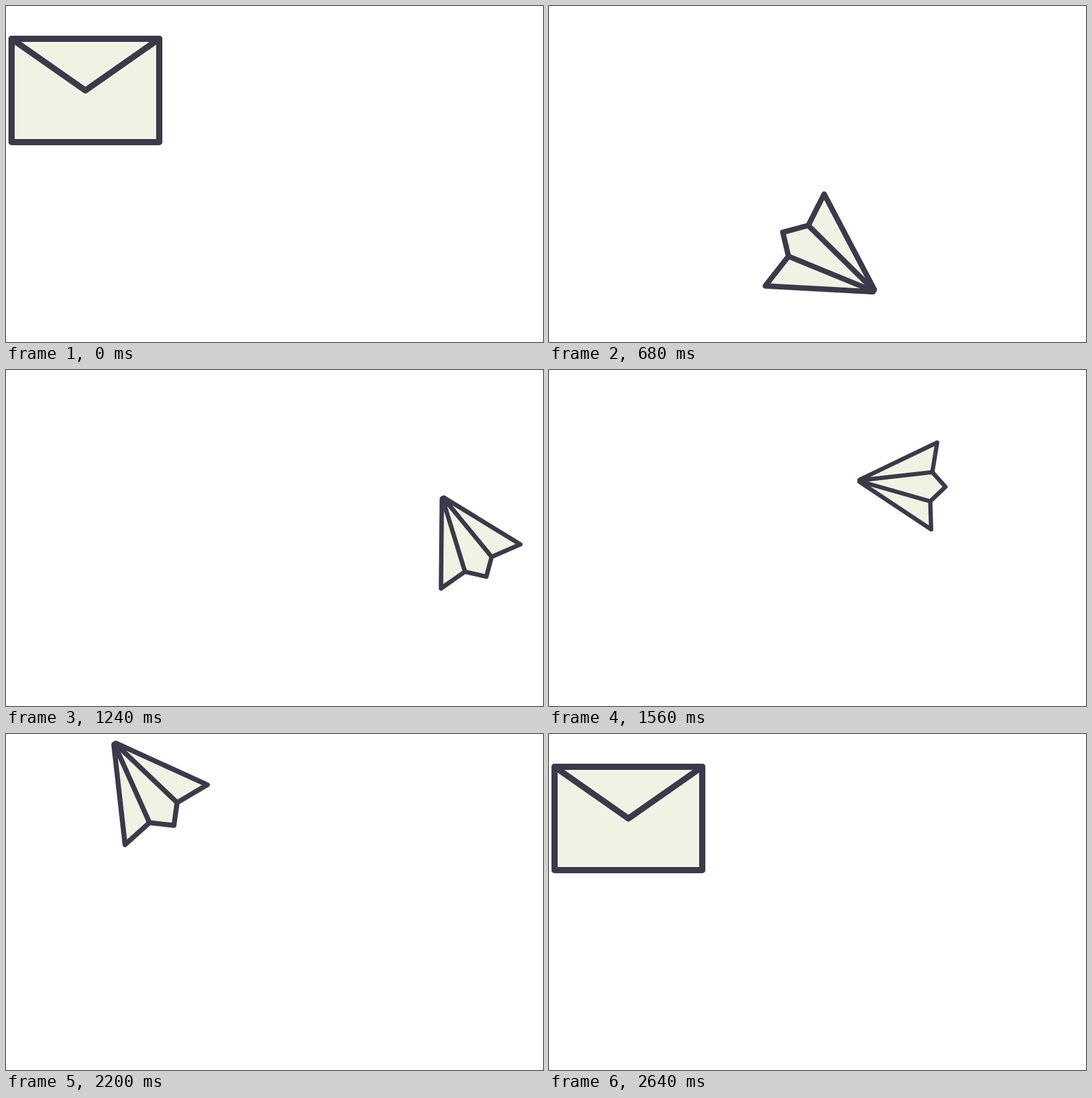
These frames come from a looping animation (869x543 px, 2.68 s). An HTML page:

```html
<!DOCTYPE html>
<html lang="en">
<head>
<meta charset="utf-8">
<title>Envelope to paper plane</title>
<style>
  html, body { margin: 0; width: 100%; height: 100%; overflow: hidden; background: #fff; }
  svg { display: block; width: 100%; height: 100%; }
</style>
</head>
<body>
<svg viewBox="0 0 869 543">
  <g id="mail" fill="#f0f2e3" stroke="#3a3a4a" stroke-width="10" stroke-linejoin="round" stroke-linecap="round">
    <path id="body"/>
    <path id="folds" fill="none"/>
  </g>
</svg>
<script>
const LOOP = 2680, STEP = 40, START = 160, END = 2640, FOLD = 364;
const SPIN = .15; // turning speed at take-off, degrees per ms
const mail = document.getElementById('mail');
const body = document.getElementById('body');
const folds = document.getElementById('folds');

// Waypoints: time, centre x, centre y, rotation (0 = pointing up)
const path = [
  [START, 128.5, 136.5, 0],
  [440, 245, 284.5, 96],
  [720, 506, 432, 118],
  [920, 726, 419, 50],
  [1080, 808, 342, 10],
  [1240, 736, 259.5, -29],
  [1560, 560, 183, -86],
  [1880, 381, 108.4, -69.3],
  [2200, 215.6, 70.4, -36],
  [END, 128.5, 136.5, 0]
];

const lerp = (a, b, k) => a + (b - a) * k;

function slope(i, c) {
  if (i === 0) return c === 3 ? SPIN : 0;
  if (i === path.length - 1) return 0;
  const [a, b, d] = path.slice(i - 1, i + 2);
  const l = b[0] - a[0], r = d[0] - b[0];
  return ((b[c] - a[c]) / l * r + (d[c] - b[c]) / r * l) / (l + r);
}

// Smooth cubic curve through the waypoints
function pose(t) {
  let i = 0;
  while (i < path.length - 2 && t >= path[i + 1][0]) i++;
  const a = path[i], b = path[i + 1], d = b[0] - a[0];
  const u = (t - a[0]) / d, v = 1 - u;
  return [1, 2, 3].map(c =>
    a[c] * v * v * (1 + 2 * u) + b[c] * u * u * (3 - 2 * u) +
    d * u * v * (slope(i, c) * v - slope(i + 1, c) * u));
}

// Shrinks steadily, cruises, grows back; folding squeezes it a little
function size(t, k) {
  const away = Math.min(.26 * (t - START) / 1000, .31, .44 * (END - t) / 1000);
  return 1 - away - .04 * Math.sin(Math.PI * k);
}

// k = 0: envelope, k = 1: plane
function fold(k) {
  const top = -83.5, bottom = 83.5, rest = 1 - k;
  const nose = lerp(119.5, 2.5, k), wing = lerp(119.5, 102, k);
  const wingY = lerp(bottom, 92, k), notchY = lerp(bottom, 85.3, k), tailY = lerp(bottom, 118.5, k);
  const left = -36.5, right = 32;
  body.setAttribute('d', `M${-nose} ${top}H${nose}L${wing} ${wingY}L${right} ${notchY}` +
    `L0 ${tailY}L${left} ${notchY}L${-wing} ${wingY}Z`);

  // The flap's creases slide into the plane's two inner folds
  const creaseX = lerp(1, 119.5, rest ** 2), out = 1 - rest ** 3, y = notchY * out;
  folds.setAttribute('d', `M${-creaseX} ${top}L${left * out} ${y}M${creaseX} ${top}L${right * out} ${y}`);
}

function draw(now) {
  const frame = Math.floor(now % LOOP / STEP) * STEP;
  const t = Math.min(END, Math.max(START, frame));
  const k = Math.min(1, (t - START) / FOLD, (END - t) / FOLD);
  const [x, y, turn] = pose(t);
  fold(k);
  mail.setAttribute('transform', `translate(${x} ${y}) rotate(${turn}) scale(${size(t, k)})`);
}

let begin;
function tick(now) {
  if (begin === undefined) begin = now;
  draw(Math.max(0, now - begin));
  requestAnimationFrame(tick);
}
draw(0);
requestAnimationFrame(tick);
</script>
</body>
</html>
```
